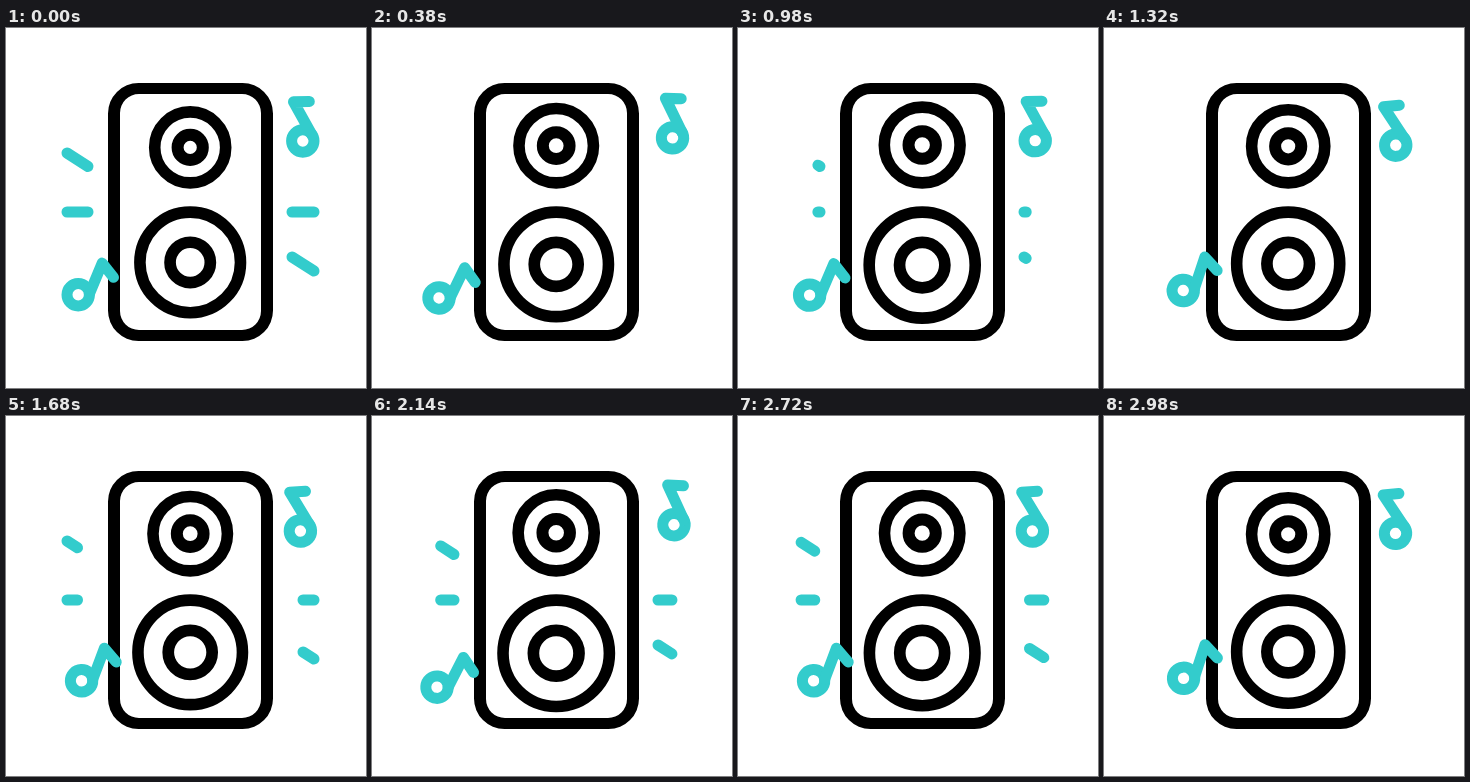
An HTML page with a canvas that plays this animation: 360x360 px, repeating every 3000 ms.

```html
<!DOCTYPE html>
<html lang="en">
<head>
<meta charset="utf-8">
<title>Speaker</title>
<style>
  html, body { margin: 0; width: 100%; height: 100%; overflow: hidden; background: #fff; }
  canvas { display: block; width: 360px; height: 360px; }
</style>
</head>
<body>
<canvas id="stage" width="360" height="360"></canvas>
<script>
const ctx = document.getElementById('stage').getContext('2d');
const LOOP = 3000, BEAT = 540, PEAK = 490, FIRST_RAY = 425;
const BLACK = '#000', TEAL = '#33cccc';

const clamp = v => Math.max(0, Math.min(1, v));
const ease = v => (1 - Math.cos(Math.PI * clamp(v))) / 2;
const mix = (a, b, k) => a + (b - a) * k;

// Rays run outward from the first point to the second.
const rays = [
  [82, 138.5, 61, 125],
  [82, 184, 61, 184],
  [286, 184, 308, 184],
  [286, 229, 308, 243]
];

function path(points) {
  ctx.beginPath();
  points.forEach(([x, y]) => ctx.lineTo(x, y));
  ctx.stroke();
}

// Stroke a circle whose outer edge has radius r.
function ring(x, y, r, width) {
  ctx.lineWidth = width;
  ctx.beginPath();
  ctx.arc(x, y, r - width / 2, 0, Math.PI * 2);
  ctx.stroke();
}

// Notes leave the rest pose, then sway between two extremes.
function sway(t) {
  return t < 600 ? ease(t / 600) : Math.cos(Math.PI * (t - 600) / 800);
}

// Growth of the cones: a short swell on every beat.
function pulse(t) {
  const low = PEAK - BEAT / 2;
  if (t < low) return 0.022 * ease(t / low);
  return 0.022 + 0.0315 * Math.cos(Math.PI * (t - PEAK) / BEAT) ** 4;
}

function raySpan(t) {
  if (t < FIRST_RAY) return [clamp(t / 160), 1];
  const u = (t - FIRST_RAY) % BEAT;
  return [clamp((u - 95) / 160), clamp(u / 150)];
}

function drawRays(t) {
  const [from, to] = raySpan(t);
  if (to - from < 0.01) return;
  for (const [x1, y1, x2, y2] of rays) {
    path([from, to].map(k => [mix(x1, x2, k), mix(y1, y2, k)]));
  }
}

function drawNote(x, y, degrees, stem) {
  ctx.save();
  ctx.translate(x, y);
  ctx.rotate(degrees * Math.PI / 180);
  ring(0, 0, 16.7, 11);
  path(stem);
  ctx.restore();
}

function drawSpeaker(t) {
  const g = pulse(t);
  ctx.beginPath();
  ctx.roundRect(102, 55, 165, 258, 30.5);
  ctx.roundRect(114, 66, 141, 236, 19);
  ctx.fill('evenodd');

  // The upper cone grows from its bottom edge, the lower from its top edge.
  const upper = 1 + 1.2 * g, top = 160.7 - 41.3 * upper;
  ring(184.2, top, 41.3 * upper, 11.6);
  ring(184.2, top, 18.6 * upper, 12);

  const lower = 1 + g, low = 178.3 + 56.1 * lower;
  ring(184.2, low, 56.1 * lower, 11.6);
  ring(184.2, low, 26 * (1 + 2 * g), 11.7);
}

function draw(t) {
  const p = sway(t);
  ctx.fillStyle = '#fff';
  ctx.fillRect(0, 0, 360, 360);
  ctx.lineCap = ctx.lineJoin = 'round';

  ctx.fillStyle = ctx.strokeStyle = BLACK;
  drawSpeaker(t);

  ctx.strokeStyle = TEAL;
  ctx.lineWidth = 11;
  drawRays(t);
  drawNote(296.8 + 5.3 * p, 113 - 4.4 * p, 4.5 * p,
    [[6.5, -39.5], [-9.3, -39.2], [9.5, -5.5]]);
  drawNote(72.2 - 7.4 * p, 266.8 + 4.5 * p, 4.5 * p,
    [[35.3, -17.5], [24, -31.7], [11.2, -1]]);
}

let start;
function tick(now) {
  if (start === undefined) start = now;
  draw((now - start) % LOOP);
  requestAnimationFrame(tick);
}
draw(0);
requestAnimationFrame(tick);
</script>
</body>
</html>
```
